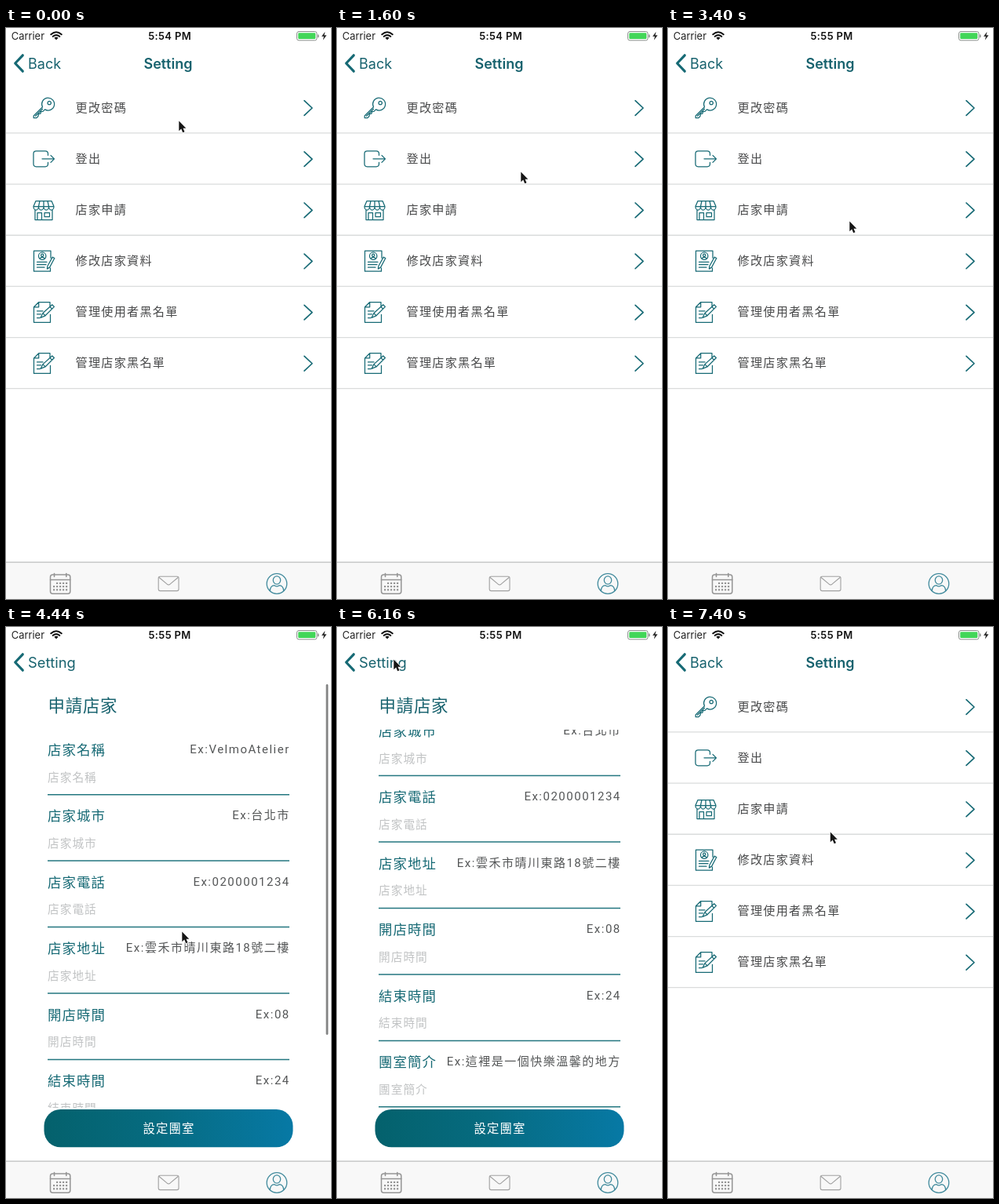
Recreate the animation shown at these times as an HTML page with a canvas. Size 414 by 728 pixels, loop 7.44 s.

```html
<!DOCTYPE html>
<html lang="zh-Hant">
<head>
<meta charset="utf-8">
<title>Setting</title>
<style>
html, body { margin: 0; width: 100%; height: 100%; overflow: hidden; background: #fff; }
canvas { display: block; width: 414px; height: 728px; }
</style>
</head>
<body>
<canvas id="stage"></canvas>
<script>
const W = 414, H = 728, LOOP = 7440;
const canvas = document.getElementById('stage');
const ctx = canvas.getContext('2d');
const dpr = window.devicePixelRatio || 1;
canvas.width = W * dpr;
canvas.height = H * dpr;

const TEAL = '#176a75', NAV = '#17626e', INK = '#48494a', GREY = '#959595';
const UI = 'Inter, "Noto Sans CJK TC", sans-serif';
const CJK = 'Roboto, "Noto Sans CJK TC", "Noto Sans CJK", sans-serif';
const PUSH = 3440, POP = 6240, SLIDE = 400;
const DRAG = 4440, RELEASE = 5280, MAX_SCROLL = 108.5, DRAG_Y = 388;

const ICONS = {
  key: 'M-1.5 -1A8 8 0 1 1 1.5 2.2L-1 4.7 -3.5 4.9 -4 7.5 -6.5 8 -7 10.8 -9 13H-12.8V10.3Z' +
    'M5 -6.2a2.2 2.2 0 1 1 4.4 0a2.2 2.2 0 1 1 -4.4 0M-10.5 10.5L-1.5 1.5',
  logout: 'M5.5 -4.5V-6.5Q5.5 -10 2 -10H-9.5Q-13 -10 -13 -6.5V6.5Q-13 10 -9.5 10H2Q5.5 10 5.5 6.5V4.5' +
    'M-2 0H13.5M9 -4.5L13.5 0 9 4.5',
  store: 'M-10 -11.5H10L13 -4.5H-13ZM-5 -11.5L-6.5 -4.5M0 -11.5V-4.5M5 -11.5L6.5 -4.5' +
    'M-13 -4.5a3.25 4.5 0 0 0 6.5 0a3.25 4.5 0 0 0 6.5 0a3.25 4.5 0 0 0 6.5 0a3.25 4.5 0 0 0 6.5 0' +
    'M-11 0V12.5H11V0M-8 12.5V3.5H-2.5V12.5M1 3.5H7.5V8.5H1Z',
  profile: 'M9 -4V-13H-12.5V13H8.5V9M-6.5 -6.5a4.7 4.7 0 1 1 9.4 0a4.7 4.7 0 1 1 -9.4 0' +
    'M-3.4 -7.5a1.6 1.6 0 1 1 3.2 0a1.6 1.6 0 1 1 -3.2 0M-4.8 -3.4Q-1.8 -6.4 1.2 -3.4' +
    'M-8.5 1.2H4M-8.5 4.5H3M-8.5 8H1M11.2 -5L13.8 -3.6 7.6 8 4.4 10 4.8 6.6Z',
  edit: 'M8 -7V-12.8H-6.3L-12.5 -6.5V13H8.5V3M-6.3 -12.8V-6.5H-12.5' +
    'M10.8 -9.5L13.4 -6.9 2 4.5 -4 7 -1 1.2ZM-1 1.2L2 4.5M8 -6.8L10.6 -4.2' +
    'M-8.5 -1.5H-1M-8.5 2.5H-3.5M-8.5 7.2H-5'
};
const ROWS = [
  ['key', '更改密碼'], ['logout', '登出'], ['store', '店家申請'],
  ['profile', '修改店家資料'], ['edit', '管理使用者黑名單'], ['edit', '管理店家黑名單']
];
const FIELDS = [
  ['店家名稱', 'VelmoAtelier'], ['店家城市', '台北市'], ['店家電話', '0200001234'],
  ['店家地址', '雲禾市晴川東路18號二樓'], ['開店時間', '08'], ['結束時間', '24'],
  ['團室簡介', '這裡是一個快樂溫馨的地方']
];
// time, x, y of the pointer tip
const POINTER = [
  [0, 220, 118], [500, 220, 118], [1480, 234, 183], [2200, 234, 183], [3240, 231, 246],
  [3640, 231, 246], [4360, 224, DRAG_Y], [DRAG, 224, DRAG_Y], [5200, 221, 18],
  [RELEASE, 221, 18], [6080, 72, 41], [6400, 72, 41], [7360, 206.5, 261], [LOOP, 206.5, 261]
];

const clamp = v => Math.max(0, Math.min(1, v));
const ramp = (t, start, len) => clamp((t - start) / len);
const mix = (a, b, p) => a + (b - a) * p;
const smooth = p => p * p * (3 - 2 * p);
const easeOut = p => 1 - Math.pow(1 - p, 3);
const slideEase = p => 1 - Math.pow(1 - p, 3.2) * (1 + 1.6 * p);

function text(str, x, y, size, color, opt = {}) {
  ctx.font = `${opt.weight || 400} ${size}px ${opt.font || CJK}`;
  ctx.letterSpacing = (opt.gap || 0) + 'px';
  ctx.textAlign = opt.align || 'left';
  ctx.fillStyle = color;
  ctx.fillText(str, x, y);
}

function stroke(d, color, width, x = 0, y = 0) {
  ctx.save();
  ctx.translate(x, y);
  ctx.strokeStyle = color;
  ctx.lineWidth = width;
  ctx.stroke(new Path2D(d));
  ctx.restore();
}

function fill(d, color) {
  ctx.fillStyle = color;
  ctx.fill(new Path2D(d));
}

function box(x, y, w, h, color, r = 0) {
  ctx.beginPath();
  ctx.roundRect(x, y, w, h, r);
  ctx.fillStyle = color;
  ctx.fill();
}

function outline(x, y, w, h, r, color, width) {
  ctx.beginPath();
  ctx.roundRect(x, y, w, h, r);
  ctx.strokeStyle = color;
  ctx.lineWidth = width;
  ctx.stroke();
}

function pointerAt(t) {
  let i = 1;
  while (i < POINTER.length - 1 && POINTER[i][0] < t) i++;
  const [t0, x0, y0] = POINTER[i - 1], [t1, x1, y1] = POINTER[i];
  const p = smooth(ramp(t, t0, t1 - t0));
  return { x: mix(x0, x1, p), y: mix(y0, y1, p) };
}

// Follows the drag, with a rubber band past the end
function dragScroll(t) {
  if (t < DRAG) return 0;
  const d = DRAG_Y - pointerAt(t).y;
  if (d <= MAX_SCROLL) return d;
  const dim = 830;
  return MAX_SCROLL + dim * (1 - 1 / ((d - MAX_SCROLL) * 0.55 / dim + 1));
}

function scrollAt(t) {
  if (t <= RELEASE) return dragScroll(t);
  return mix(dragScroll(RELEASE), MAX_SCROLL, easeOut(ramp(t, RELEASE, 480)));
}

function drawList() {
  box(0, 70, W, 611, '#fff');
  ROWS.forEach(([icon, label], i) => {
    const y = 101.7 + i * 65.15;
    stroke(ICONS[icon], TEAL, 1.25, 48, y);
    text(label, 88.5, y + 5, 15.1, INK, { gap: 1.3 });
    stroke('M-5 -9.3L5 0 -5 9.3', TEAL, 1.7, 385, y + 0.3);
    box(0, y + 31.6, W, 1.3, '#dadcdc');
  });
}

function drawBar(t, scroll) {
  const alpha = ramp(t, 3960, 200) * (1 - ramp(t, 5700, 260));
  if (!alpha) return;
  const over = Math.max(0, scroll - MAX_SCROLL);
  const top = 73 + 89 * clamp(scroll / MAX_SCROLL) + over;
  ctx.save();
  ctx.globalAlpha *= alpha;
  box(407.6, top, 2.8, 447 - over, '#828383', 1.4);
  ctx.restore();
}

function drawForm(t) {
  const scroll = scrollAt(t);
  box(0, 70, W, 611, '#fff');
  text('申請店家', 53.5, 107.9, 21.4, NAV, { gap: 0.8 });

  ctx.save();
  ctx.beginPath();
  ctx.rect(0, 131, W, 482);
  ctx.clip();
  FIELDS.forEach(([name, sample], i) => {
    const y = 156.4 + i * 84.45 - scroll;
    text(name, 53, y + 6.6, 17.4, TEAL, { gap: 1.1 });
    text('Ex:' + sample, 361.8, y + 4.5, 15, '#545657', { gap: 1.5, align: 'right' });
    text(name, 53, y + 40.2, 14.7, '#c1c3c4', { gap: 1 });
    box(53, y + 56.5, 308, 1.5, '#23767f');
  });
  ctx.restore();

  const shade = ctx.createLinearGradient(48, 0, 366, 0);
  shade.addColorStop(0, '#04616c');
  shade.addColorStop(0.45, '#066b80');
  shade.addColorStop(1, '#0779a5');
  box(48.5, 615, 317, 48.3, shade, 21);
  text('設定團室', 207.6, 645.3, 15.4, '#fff', { gap: 1.1, align: 'center' });
  drawBar(t, scroll);
}

function faded(alpha, draw) {
  if (alpha <= 0) return;
  ctx.save();
  ctx.globalAlpha = alpha;
  draw();
  ctx.restore();
}

function drawNav(p) {
  box(0, 0, W, 70, '#fff');
  stroke('M21.3 34.8L11.7 45 21.3 55.2', TEAL, 3.2);
  faded(1 - p * 1.6, () => text('Back', 28 - 60 * p, 51.6, 18, NAV, { font: UI }));
  const x = mix(175.5, 28, p);
  faded(1 - p, () => text('Setting', x, 51.6, 18, NAV, { font: UI, weight: 600 }));
  faded(p, () => text('Setting', x, 51.6, 18.3, NAV, { font: UI }));
}

function drawStatus(t) {
  const clock = t < 2300 ? '5:54 PM' : '5:55 PM';
  text('Carrier', 6.8, 14.6, 12.9, '#222', { font: UI });
  text(clock, 208.6, 14.6, 13, '#111', { font: UI, weight: 600, gap: 0.35, align: 'center' });
  stroke('M57.2 8.2Q64 2.4 70.8 8.2M59.7 10.8Q64 7.2 68.3 10.8', '#111', 2);
  fill('M61.4 12.6Q64 10.6 66.6 12.6L64 15.3Z', '#111');
  outline(370.5, 4.5, 25.5, 11.3, 2.6, '#8b908c', 1);
  box(372.2, 6.2, 22.1, 7.9, '#42d658', 1.3);
  box(397, 8.2, 1.5, 4, '#8b908c', 0.7);
  fill('M406.4 4.8L402 10.8H404.9L403.8 15.4 408.4 9.2H405.4Z', '#222');
}

function drawTabs() {
  box(0, 681, W, 47, '#f8f8f8');
  box(0, 680.5, W, 1.2, '#bcbebe');

  outline(56.5, 697, 25.3, 24.3, 3, GREY, 1.5);
  stroke('M56.5 703.5H81.8M61.5 695.5V699.5M76.8 695.5V699.5', GREY, 1.6);
  for (let r = 0; r < 3; r++)
    for (let c = 0; c < 5; c++)
      if (r || c) box(60 + c * 4, 706.8 + r * 4.2, 2.2, 2.2, GREY);

  outline(194.2, 699.2, 25.8, 18.4, 2, '#a0a0a0', 1.1);
  stroke('M195 700.5L205.3 709.2Q207.1 710.6 208.9 709.2L219.2 700.5', '#a0a0a0', 1.1);

  stroke('M332.2 708.5a12.8 12.8 0 1 1 25.6 0a12.8 12.8 0 1 1 -25.6 0' +
    'M340.3 704a4.7 5.1 0 1 1 9.4 0a4.7 5.1 0 1 1 -9.4 0' +
    'M336.3 718Q336.5 711 342 710.7Q345 713 348 710.7Q353.5 711 353.7 718', '#428b9d', 1.3);
}

function drawPointer(t) {
  const { x, y } = pointerAt(t);
  ctx.save();
  ctx.translate(x, y);
  const d = 'M0.3 0.5V13.2L3.2 10.5 5.2 15.3 7.5 14.3 5.5 9.7H9.3Z';
  stroke(d, '#fff', 1.6);
  fill(d, '#161616');
  ctx.restore();
}

function drawPages(t, p) {
  ctx.save();
  ctx.beginPath();
  ctx.rect(0, 70, W, 611);
  ctx.clip();
  if (p < 1) {
    ctx.save();
    ctx.translate(-124 * p, 0);
    drawList();
    ctx.restore();
    if (p > 0) box(0, 70, W, 611, `rgba(0,0,0,${0.1 * p})`);
  }
  if (p > 0) {
    ctx.save();
    ctx.translate(W * (1 - p), 0);
    drawForm(t);
    ctx.restore();
  }
  ctx.restore();
}

function frame(now) {
  const t = now % LOOP;
  const p = slideEase(ramp(t, PUSH, SLIDE)) - slideEase(ramp(t, POP, SLIDE));
  ctx.setTransform(dpr, 0, 0, dpr, 0, 0);
  ctx.lineCap = 'round';
  ctx.lineJoin = 'round';
  box(0, 0, W, H, '#fff');
  drawPages(t, p);
  drawNav(p);
  drawStatus(t);
  drawTabs();
  drawPointer(t);
}

const start = performance.now();
function tick() {
  frame(performance.now() - start);
  requestAnimationFrame(tick);
}
tick();
</script>
</body>
</html>
```
